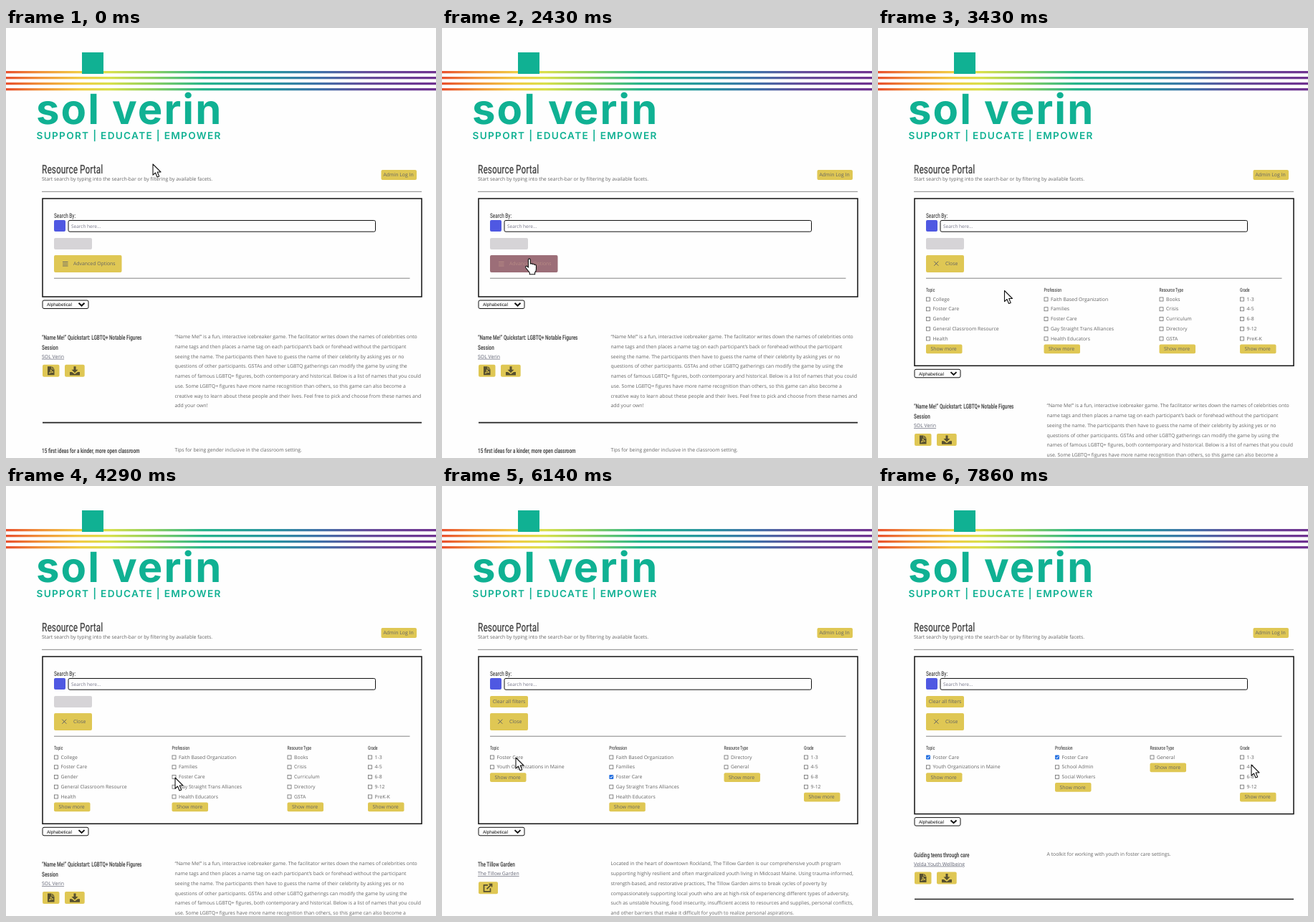
An HTML page for the animation above (8 s loop, 600 by 600 pixels).

```html
<!DOCTYPE html>
<html lang="en">
<head>
<meta charset="utf-8">
<title>Resource Portal</title>
<style>
html, body { margin: 0; width: 100%; height: 100%; overflow: hidden; background: #fefefe; }
svg { display: block; width: 100vw; height: 100vh; }
text { font: 6.88px "Open Sans", sans-serif; fill: #646464; text-rendering: geometricPrecision; white-space: pre; }
.narrow { font-family: Roboto, sans-serif; fill: #4c4c4c; }
.mark { font: 700 58px Inter, sans-serif; fill: #10b193; letter-spacing: 2.1px; }
.motto { font: 600 13.6px Inter, sans-serif; fill: #10b193; letter-spacing: 1.32px; }
.link { text-decoration: underline; fill: #5f6272; }
.gold { fill: #dfc754; }
.icon { fill: #57502f; }
.rule { stroke: #858585; }
.box { fill: none; stroke: #111; }
</style>
</head>
<body>
<svg viewBox="0 0 600 600">
  <defs>
    <linearGradient id="rainbow" gradientUnits="userSpaceOnUse" x1="0" x2="600">
      <stop offset="0" stop-color="#e8502e"/>
      <stop offset=".08" stop-color="#f0923a"/>
      <stop offset=".17" stop-color="#f1cb45"/>
      <stop offset=".24" stop-color="#d9e04c"/>
      <stop offset=".34" stop-color="#8fd05f"/>
      <stop offset=".46" stop-color="#27b58c"/>
      <stop offset=".62" stop-color="#2893a0"/>
      <stop offset=".73" stop-color="#4070a8"/>
      <stop offset=".84" stop-color="#654b9a"/>
      <stop offset="1" stop-color="#703290"/>
    </linearGradient>
  </defs>
  <path d="M0 60h600v3.200H0zM0 68h600v3.200H0zM0 76h600v3.200H0zM0 84h600v3.200H0z" fill="url(#rainbow)"/>
  <rect x="106" y="34" width="30" height="30" fill="#10b193"/>
  <text class="mark" x="42" y="134">sol verin</text>
  <text class="motto" x="42.5" y="155">SUPPORT | EDUCATE | EMPOWER</text>
  <g id="page"></g>
  <g id="states"></g>
  <g id="cursor">
    <path id="arrow" d="M0 0V15.200L3.500 12 6 18 8.700 16.900 6.200 11H11z" fill="#fff" stroke="#111" stroke-width="1.100" stroke-linejoin="round"/>
    <path id="beam" d="M-3.500-7h2.500q1 0 1 1 0-1 1-1h2.500M0-6V7M-3.500 8h2.500q1 0 1-1 0 1 1 1h2.500" fill="none" stroke="#111" stroke-width="1.400"/>
    <path id="hand" transform="scale(.92)" d="M0 1.500Q0-.8 1.600-.8T3.200 1.500V7Q5.500 5.800 6.200 7.600 8.500 6.600 9.200 8.500 12 7.600 12 10.300V15Q12 18.500 10 20V23H2V20.500L-3.500 13.500Q-5 11-3 10.500-1.500 10.300 0 12.500z" fill="#fff" stroke="#111" stroke-width="1.200" stroke-linejoin="round"/>
  </g>
</svg>
<script>
const $ = id => document.getElementById(id);
const ROW = 13.75;

const text = (x, y, s, attrs = '') => `<text x="${x}" y="${y}" ${attrs}>${s}</text>`;
const narrow = (x, y, s, size, weight = 500) =>
  `<text class="narrow" transform="translate(${x} ${y}) scale(.7 1)" style="font-size:${size}px;font-weight:${weight}">${s}</text>`;
const rect = (x, y, w, h, attrs = 'class="gold"', r = 2) =>
  `<rect x="${x}" y="${y}" width="${w}" height="${h}" rx="${r}" ${attrs}/>`;
const rule = (x1, x2, y, attrs = 'class="rule"') => `<path d="M${x1} ${y}H${x2}" ${attrs}/>`;

$('page').innerHTML =
  narrow(50, 203, 'Resource Portal', 17) +
  text(50, 212.8, 'Start search by typing into the search-bar or by filtering by available facets.') +
  rect(523.5, 198, 49.5, 14) + text(526.5, 207.2, 'Admin Log In') +
  rule(50, 580, 228.3) +
  narrow(67, 264.8, 'Search By:', 9.1) +
  rect(67, 268, 16, 16, 'fill="#4f58e2"') +
  rect(87, 268.5, 428.5, 15.7, 'class="box"') +
  text(91, 278.6, 'Search here...', 'style="font-size:6.5px;fill:#77778a"') +
  rect(67, 293, 53, 16, 'id="clear"') + text(70.7, 303.2, 'Clear all filters', 'id="clearText"') +
  rect(67, 317, 94.5, 24, 'id="toggle"') +
  `<g id="toggleText">
    <g id="open">${text(94, 331, 'Advanced Options')}<path d="M79 326.500h7.500M79 329.200h7.500M79 331.900h7.500" stroke="#555"/></g>
    <g id="close">${text(94, 331, 'Close')}<path d="M78.300 325.700l6 6m0-6l-6 6" stroke="#555"/></g>
  </g>` +
  rule(67, 563.5, 349.2);

// dy shifts the sort menu and everything below the search panel
const panel = dy =>
  rect(51, 238, 529, 137 + dy, 'class="box" stroke-width="1.5"', 0) +
  rect(51, 380 + dy, 64, 11.5, 'class="box"') +
  text(57, 388.2 + dy, 'Alphabetical', 'style="font:6.4px Liberation Sans,sans-serif;fill:#111"') +
  `<path d="M101.500 ${383.8 + dy}l4 3.800 4-3.800" fill="none" stroke="#111" stroke-width="2"/>`;

const check = (x, y, on, id = '') => on
  ? `<g ${id}>${rect(x, y, 6, 6, 'fill="#2470e0"', 1)}<path d="M${x + 1.2} ${y + 3}l1.300 1.400 2.400-3" fill="none" stroke="#fff"/></g>`
  : rect(x + .5, y + .5, 5, 5, 'fill="#fff" stroke="#6c6c6c" stroke-width=".8"', 0);

const facet = (x, name, items, on) => {
  const end = 372.8 + items.length * ROW;
  return narrow(x, 368, name, 7.3) +
    items.map((s, i) => {
      const y = 378.5 + i * ROW;
      return check(x, y - 3, s === on) + text(x + 9.5, y + 2.2, s);
    }).join('') +
    rect(x, end, 50.5, 12.6) + text(x + 6.5, end + 8.5, 'Show more');
};

const pdf = y => rect(51, y, 23.5, 17) +
  `<path class="icon" d="M58 ${y + 2.5}h5.500v4h4v8H58z"/><path class="icon" d="M64.300 ${y + 2.5}l3.200 3.200h-3.200z"/>
   <path d="M60 ${y + 12}q3-2 2.500-5 1 3 3.500 3.500-3 0-6 1.500" fill="none" stroke="#dfc754" stroke-width=".9"/>`;
const download = y => rect(82, y, 27.7, 17) +
  `<path class="icon" d="M94.500 ${y + 2.5}h3v4.500h3l-4.500 4.500-4.500-4.500h3zM89 ${y + 10.3}h3l4 3 4-3h3v4.400H89z"/>`;
const external = y => rect(51, y, 27, 17) +
  `<path d="M64 ${y + 4.5}h-5.500v9h9v-4.500M62.500 ${y + 10}l6.500-6.500M65.500 ${y + 3.3}h4v4" fill="none" stroke="#57502f" stroke-width="1.700"/>`;

const result = (dy, title, link, icons, lines) => {
  const y = 435 + dy, last = (title.length - 1) * ROW;
  return title.map((s, i) => narrow(50, y + i * ROW, s, 9.1, 600)).join('') +
    text(50, y + last + 12, link, 'class="link"') +
    icons.map(icon => icon(y + last + 21)).join('') +
    lines.map((s, i) => text(235.5, y - 1.9 + i * ROW, s)).join('');
};

const game = dy => result(dy, ['“Name Me!” Quickstart: LGBTQ+ Notable Figures', 'Session'], 'SOL Verin', [pdf, download], [
  '“Name Me!” is a fun, interactive icebreaker game. The facilitator writes down the names of celebrities onto',
  'name tags and then places a name tag on each participant’s back or forehead without the participant',
  'seeing the name. The participants then have to guess the name of their celebrity by asking yes or no',
  'questions of other participants. GSTAs and other LGBTQ gatherings can modify the game by using the',
  'names of famous LGBTQ+ figures, both contemporary and historical. Below is a list of names that you could',
  'use. Some LGBTQ+ figures have more name recognition than others, so this game can also become a',
  'creative way to learn about these people and their lives. Feel free to pick and choose from these names and',
  'add your own!'
]);

const thick = 'stroke="#222" stroke-width="1.600"';
const grades = ['1-3', '4-5', '6-8', '9-12'];
const professions = ['Faith Based Organization', 'Families', 'Foster Care', 'Gay Straight Trans Alliances', 'Health Educators'];
const local = ['Foster Care', 'Youth Organizations in Maine'];

const states = [
  panel(0) + game(0) + rule(51, 580, 550.6, thick) +
    result(158, ['15 first ideas for a kinder, more open classroom'], '', [], ['Tips for being gender inclusive in the classroom setting.']),

  panel(96.3) + game(96.3) +
    facet(67, 'Topic', ['College', 'Foster Care', 'Gender', 'General Classroom Resource', 'Health']) +
    facet(231.5, 'Profession', professions) +
    facet(392.5, 'Resource Type', ['Books', 'Crisis', 'Curriculum', 'Directory', 'GSTA']) +
    facet(505, 'Grade', [...grades, 'PreK-K']) +
    check(231.5, 403, true, 'id="pick1"'),

  panel(96.3) +
    facet(67, 'Topic', local) +
    facet(233.3, 'Profession', professions, 'Foster Care') +
    facet(393.5, 'Resource Type', ['Directory', 'General']) +
    facet(505, 'Grade', grades) +
    check(67, 375.5, true, 'id="pick2"') +
    result(96.3, ['The Tillow Garden'], 'The Tillow Garden', [external], [
      'Located in the heart of downtown Rockland, The Tillow Garden is our comprehensive youth program',
      'supporting highly resilient and often marginalized youth living in Midcoast Maine. Using trauma-informed,',
      'strength-based, and restorative practices, The Tillow Garden aims to break cycles of poverty by',
      'compassionately supporting local youth who are at high-risk of experiencing different types of adversity,',
      'such as unstable housing, food insecurity, insufficient access to resources and supplies, personal conflicts,',
      'and other barriers that make it difficult for youth to realize personal aspirations.'
    ]),

  panel(82.6) +
    facet(67, 'Topic', local, 'Foster Care') +
    facet(247, 'Profession', ['Foster Care', 'School Admin', 'Social Workers'], 'Foster Care') +
    facet(379.5, 'Resource Type', ['General']) +
    facet(505, 'Grade', grades) +
    result(82.6, ['Guiding teens through care'], 'Velda Youth Wellbeing', [pdf, download],
      ['A toolkit for working with youth in foster care settings.']) +
    rule(51, 580, 576.5, thick)
];
$('states').innerHTML = states.map((s, i) => `<g id="state${i}">${s}</g>`).join('');

// [tick, x, y]
const path = [
  [0, 205, 190], [8, 177, 284], [13, 177, 284], [16, 121, 322], [20, 117, 326], [28, 236, 407], [32, 236, 407],
  [33, 222, 405], [34, 177, 404], [39, 118, 394], [40, 103, 379], [43, 103, 379], [44, 72, 379], [46, 72, 379],
  [50, 260, 402], [52, 430, 396], [54, 548, 383], [55, 521, 389]
];
const clamp = v => Math.min(1, Math.max(0, v));
const mix = (a, b, k) => `rgb(${a.map((v, i) => Math.round(v + (b[i] - v) * k))})`;
const show = (id, on) => { $(id).style.display = on ? '' : 'none'; };

const GOLD = [223, 199, 84], GREY = [214, 212, 215], OLIVE = [180, 166, 98], PURPLE = [123, 66, 138];
const INK = [100, 100, 100], PINK = [226, 160, 150];

function pointer(tick) {
  const i = Math.max(1, path.findIndex(p => p[0] >= tick));
  const [t0, x0, y0] = path[i - 1], [t1, x1, y1] = path[i];
  const k = clamp((tick - t0) / (t1 - t0)), e = k * k * (3 - 2 * k);
  return [x0 + (x1 - x0) * e, y0 + (y1 - y0) * e];
}

function render(ms) {
  const tick = Math.floor((ms + 3) * 7 / 1000) % 56;
  const state = [18, 33, 46].filter(n => tick >= n).length;
  states.forEach((_, i) => show('state' + i, i === state));
  show('pick1', tick >= 32);
  show('pick2', tick >= 45);

  show('open', state === 0);
  show('close', state > 0);
  $('toggle').setAttribute('width', state ? 53 : 94.5);
  const hover = tick <= 20 ? clamp((tick - 15) / 3) : clamp((24 - tick) / 3);
  $('toggle').style.fill = mix(GOLD, PURPLE, hover);
  const ink = mix(INK, PINK, hover);
  $('toggleText').querySelectorAll('text').forEach(n => { n.style.fill = ink; });
  $('toggleText').querySelectorAll('path').forEach(n => { n.style.stroke = ink; });

  $('clear').style.fill = state < 2 ? `rgb(${GREY})` : mix(OLIVE, GOLD, clamp((tick - 34) / 3));
  show('clearText', state > 1);

  const beam = tick >= 7 && tick <= 13, hand = tick >= 16 && tick <= 21;
  show('beam', beam);
  show('hand', hand);
  show('arrow', !beam && !hand);
  const [x, y] = pointer(tick);
  $('cursor').setAttribute('transform', `translate(${x.toFixed(1)} ${y.toFixed(1)})`);
}

const start = performance.now();
function loop() {
  render((performance.now() - start) % 8000);
  requestAnimationFrame(loop);
}
loop();
</script>
</body>
</html>
```
